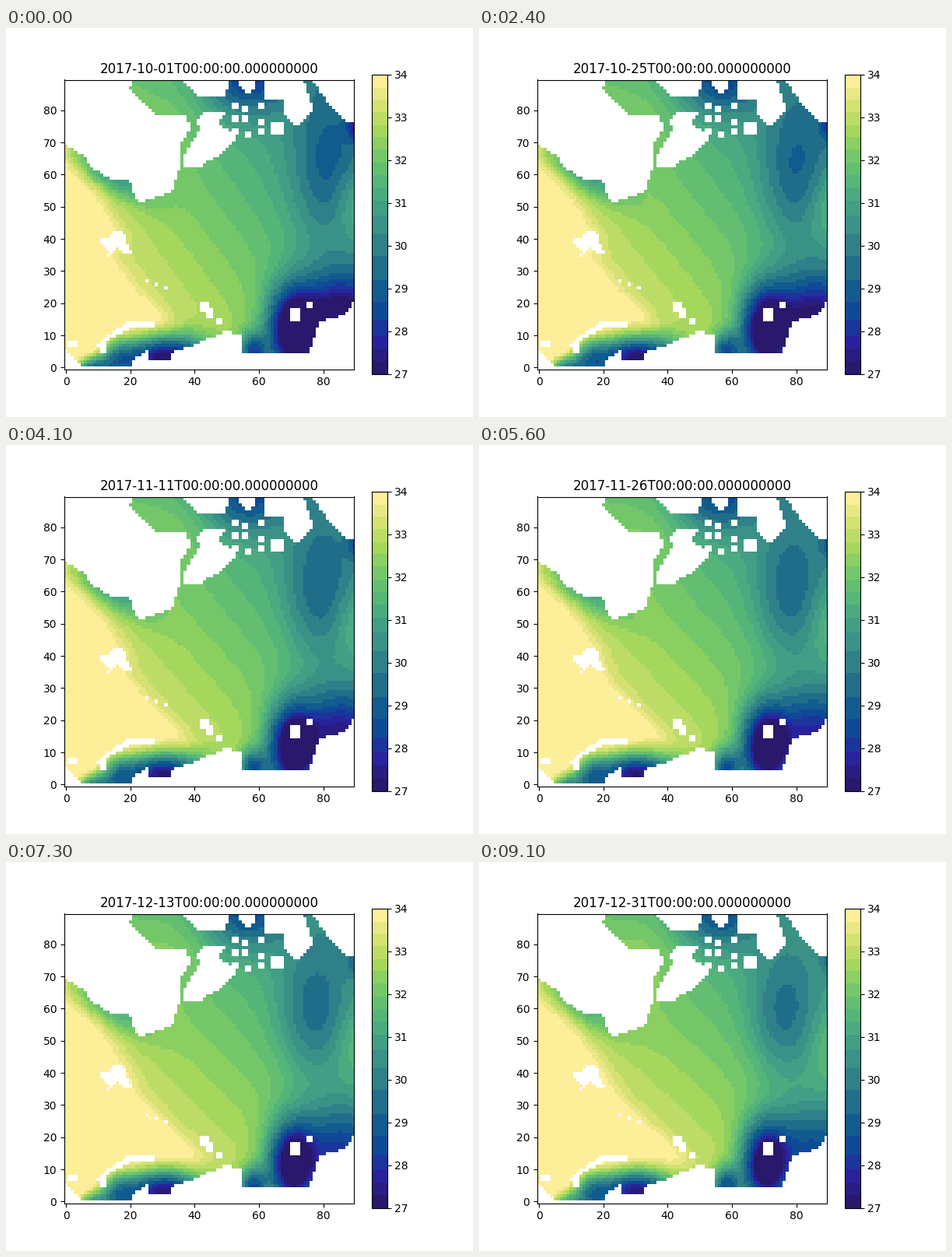
Recreate the animation shown at these times as a matplotlib script. Size 600 by 500 pixels, loop 9200 ms.

```python
import numpy as np
import matplotlib.pyplot as plt
from matplotlib.animation import FuncAnimation
from matplotlib.colors import LinearSegmentedColormap, ListedColormap
from matplotlib.path import Path

plt.rcParams["text.kerning_factor"] = 6

SIZE, DAYS = 90, 92
VMIN, VMAX = 27, 34
Y, X = np.mgrid[:SIZE, :SIZE].astype(float)

# Coastline corners, in cells from the lower left
COASTS = [
    # northwest mainland
    [(0, 90), (0, 70), (7, 66), (8, 63), (15, 59), (20, 59), (23, 52), (33, 55), (36, 63),
     (36, 70), (39, 75), (38, 79), (29, 79), (20, 87), (21, 90)],
    # large northern island
    [(44, 80), (41, 78), (42, 75), (37, 66), (37, 63), (42, 63), (50, 68), (53, 72),
     (50, 75), (47, 77), (50, 80)],
    # northern mainland pieces
    [(37, 90), (42, 85), (50, 85), (51, 90)],
    [(54, 90), (54, 88), (57, 86), (59, 88), (59, 90)],
    [(62, 90), (62, 84), (68, 84), (68, 80), (72, 75), (77, 81), (74, 90)],
    [(77, 90), (81, 84), (88, 77), (90, 77), (90, 90)],
    # southern mainland
    [(0, 0), (0, 7), (6, 1), (21, 1), (21, 3), (26, 6), (26, 3), (33, 3), (33, 5), (41, 8),
     (50, 12), (55, 11), (55, 5), (76, 5), (79, 15), (87, 17), (90, 22), (90, 0)],
    # long southern island
    [(10, 8), (14, 11), (20, 15), (28, 15), (28, 13), (21, 13), (13, 9), (13, 5), (11, 5)],
    # western island
    [(15, 43), (18, 43), (21, 36), (18, 36), (17, 38), (13, 35), (14, 37), (11, 39),
     (11, 41), (14, 41)],
]
# left, bottom, width, height
ISLETS = [(42, 18, 3, 3), (44, 16, 2, 3), (47, 14, 2, 2), (1, 7, 3, 2), (70, 15, 3, 4),
          (75, 19, 2, 2), (64, 73, 4, 4)]
ISLETS += [(x, 35 - x // 3, 1, 1) for x in (25, 28, 31)]

# Local salinity anomalies: centre, spread, strength on the first and the last day
ANOMALIES = [
    ((30, 3), (9, 5), -7.5, -7.5),     # southern river mouth
    ((16, 2), (4, 5), -3.5, -3.5),
    ((8, 0), (4, 2.5), -5, -3),
    ((58, 5), (3, 4), -4, -4),
    ((70, 11), (5, 9), -6, -6),        # southeastern river mouth
    ((85, 16), (10, 10), -5, -3.6),
    ((90, 52), (5, 8), 1.2, 0.5),      # eastern inflow
    ((90, 75), (2, 3), -2.5, -1),
    ((56, 90), (8, 7), -2.8, -2.6),    # northern straits
    ((33, 78), (8, 9), 0.3, 0.5),
]
HALINE = ["#29186b", "#2a23a0", "#0f4799", "#125f8e", "#267489", "#358888",
          "#419d85", "#51b27c", "#6fc66b", "#a0d65b", "#d3e170", "#fdee99"]


def banded_colormap(bands=20):
    """Haline ramp in flat bands, wider around the blue-green middle."""
    smooth = LinearSegmentedColormap.from_list("smooth", HALINE)
    index = np.arange(bands)
    widths = 1 + 0.9 * np.exp(-((index - 6) / 2.5) ** 2)
    edges = np.append(0, np.cumsum(widths) / widths.sum())
    samples = edges[:-1] + np.diff(edges) * index / (bands - 1)
    band = np.searchsorted(edges, np.linspace(0, 0.9999, 512), side="right") - 1
    return ListedColormap(smooth(samples[band]))


def archipelago():
    """Scattered small islands between the northern straits."""
    rng = np.random.default_rng(4)
    return [(x + rng.integers(2), y + rng.integers(2), 2, 2)
            for x in range(51, 62, 4) for y in (72, 76, 80)]


def land_mask():
    centres = np.column_stack([X.ravel(), Y.ravel()]) + 0.5
    land = np.zeros(SIZE * SIZE, bool)
    for coast in COASTS:
        land |= Path(coast + coast[:1], closed=True).contains_points(centres)
    land = land.reshape(SIZE, SIZE)
    for left, bottom, width, height in ISLETS + archipelago():
        land[bottom:bottom + height, left:left + width] = True
    return land


LAND = land_mask()


def mix(start, end, t):
    return np.asarray(start) * (1 - t) + np.asarray(end) * t


def bump(centre, spread, angle=0):
    dx, dy = X - centre[0], Y - centre[1]
    c, s = np.cos(angle), np.sin(angle)
    along, across = c * dx + s * dy, c * dy - s * dx
    return np.exp(-((along / spread[0]) ** 2 + (across / spread[1]) ** 2) / 2)


def salinity(day):
    t = day / (DAYS - 1)
    # broad decline towards the northeast
    field = (mix(32.4, 32.65, t) + mix(-0.03, -0.022, t) * (X - 40)
             + mix(-0.022, -0.025, t) * (Y - 40))
    # salty western water behind a front that spreads southeast
    front = np.interp(Y, (14, 24, 34, 42, 55, 66),
                      mix((34, 21, 14, 17, 10, 0), (45, 34, 24, 20, 12, 0), t))
    field += 1 / (1 + np.exp((X - front) / 2))
    # fresh northwestern shelf
    field += mix(-2, -1.2, t) * bump((15, 60), (9, 3.5), -0.54)
    # fresh eastern trough drifting west
    field += mix(-1.75, -1.85, t) * bump(mix((81, 62), (76, 58), t), mix((7, 15), (7, 13), t))
    for centre, spread, first, last in ANOMALIES:
        field += mix(first, last, t) * bump(centre, spread)
    return np.ma.array(field, mask=LAND)


def date_label(day):
    return str((np.datetime64("2017-10-01") + day).astype("datetime64[ns]"))


fig, ax = plt.subplots(figsize=(6, 5), dpi=100)
image = ax.imshow(salinity(0), origin="lower", cmap=banded_colormap(),
                  vmin=VMIN, vmax=VMAX, interpolation="nearest")
fig.colorbar(image, ax=ax)
title = ax.set_title(date_label(0))


def update(day):
    image.set_data(salinity(day))
    title.set_text(date_label(day))
    return image, title


anim = FuncAnimation(fig, update, frames=DAYS, interval=100, repeat=True, repeat_delay=0)
plt.show()
```
